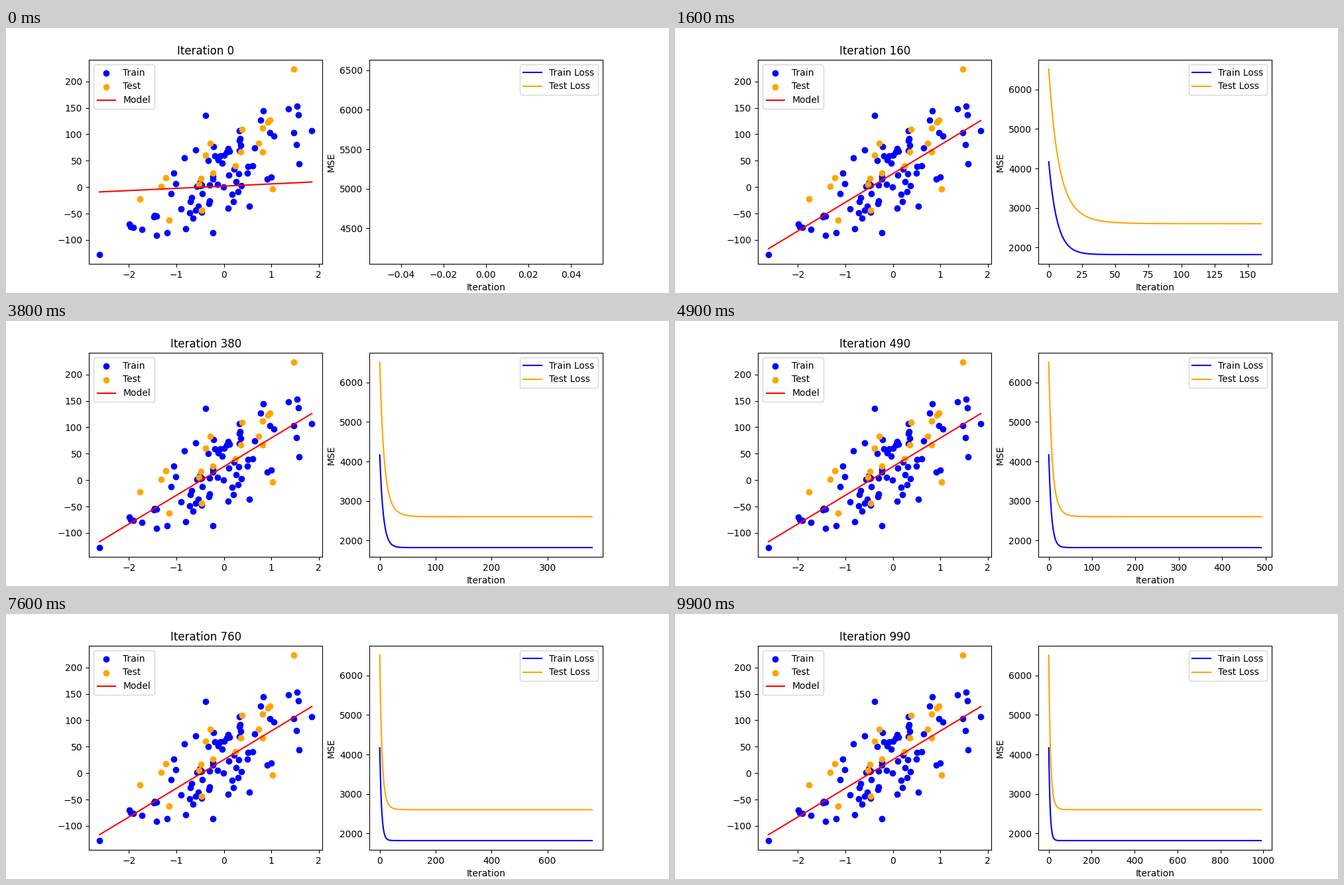
These frames come from a looping animation (1000x400 px, 10 s). A matplotlib script:

```python
import numpy as np
import matplotlib.pyplot as plt
from matplotlib.animation import FuncAnimation

SAMPLES, TEST_SIZE = 100, 20
NOISE, BIAS = 50, 25
STEPS, STRIDE, RATE = 1000, 10, 0.1


def make_data(seed=42):
    """Noisy linear samples in shuffled order."""
    rng = np.random.RandomState(seed)
    x = rng.standard_normal(SAMPLES)
    slope = 100 * rng.uniform()
    y = slope * x + BIAS + rng.normal(scale=NOISE, size=SAMPLES)
    order = np.arange(SAMPLES)
    rng.shuffle(order)
    return x[order], y[order]


def split(x, y, seed=42):
    order = np.random.RandomState(seed).permutation(SAMPLES)
    test, train = order[:TEST_SIZE], order[TEST_SIZE:]
    return x[train], y[train], x[test], y[test]


def mse(w, b, x, y):
    return np.mean((w * x + b - y) ** 2)


def descend(x_train, y_train, x_test, y_test):
    """Gradient descent; rows of (w, b, train loss, test loss)."""
    w = b = 0.0
    rows = []
    for _ in range(STEPS):
        err = w * x_train + b - y_train
        w -= RATE * np.mean(err * x_train)
        b -= RATE * np.mean(err)
        rows.append((w, b, mse(w, b, x_train, y_train),
                     mse(w, b, x_test, y_test)))
    return np.array(rows)


x, y = make_data()
x_train, y_train, x_test, y_test = split(x, y)
history = descend(x_train, y_train, x_test, y_test)
x_line = np.array([x.min(), x.max()])

fig, (ax_fit, ax_loss) = plt.subplots(1, 2, figsize=(10, 4), dpi=100)

ax_fit.scatter(x_train, y_train, color="blue", label="Train")
ax_fit.scatter(x_test, y_test, color="orange", label="Test")
model, = ax_fit.plot(x_line, 0 * x_line, color="red", label="Model")
ax_fit.legend(loc="upper left")

train_loss, = ax_loss.plot([], [], color="blue", label="Train Loss")
test_loss, = ax_loss.plot([], [], color="orange", label="Test Loss")
ax_loss.set_xlabel("Iteration")
ax_loss.set_ylabel("MSE")
ax_loss.legend(loc="upper right")


def update(frame):
    step = frame * STRIDE
    w, b = history[step, :2]
    model.set_data(x_line, w * x_line + b)
    ax_fit.set_title(f"Iteration {step}")
    steps = np.arange(step + 1)
    train_loss.set_data(steps, history[:step + 1, 2])
    test_loss.set_data(steps, history[:step + 1, 3])
    ax_loss.relim()
    ax_loss.autoscale_view()
    return model, train_loss, test_loss


def reset():
    return update(0)


anim = FuncAnimation(fig, update, frames=STEPS // STRIDE, init_func=reset,
                     interval=100, repeat=True, repeat_delay=0)
plt.show()
```
